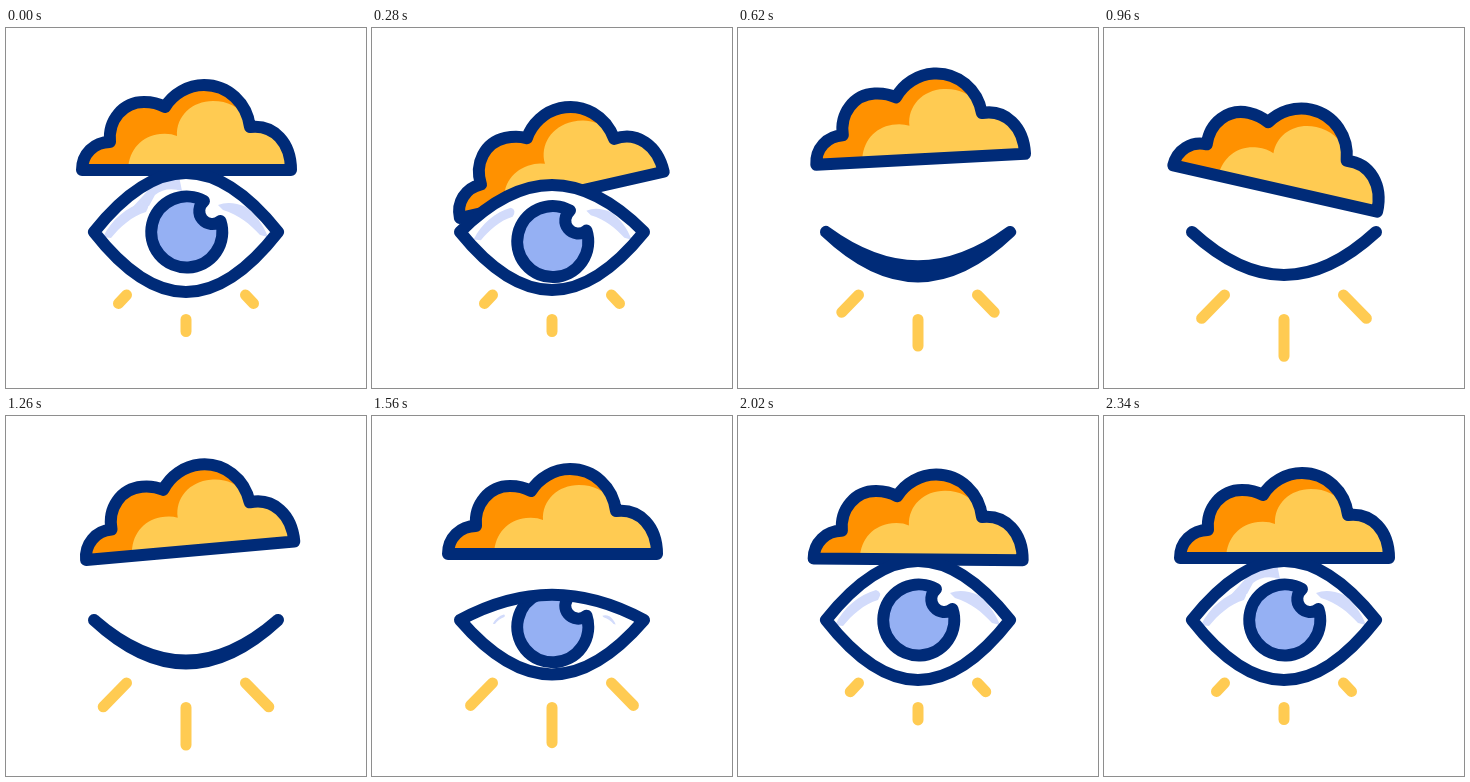
Animation, 360 px wide and 360 px high, one loop 2.4 s. Source, as an HTML page:

```html
<!DOCTYPE html>
<html lang="en">
<head>
<meta charset="utf-8">
<title>Cloud and eye</title>
<style>
html, body { margin: 0; width: 100%; height: 100%; overflow: hidden; background: #fff; }
svg { display: block; width: 100%; height: 100%; }
.line { stroke: #002b78; stroke-width: 12; stroke-linecap: round; stroke-linejoin: round; }
.shade { fill: #d2dbfb; }
</style>
</head>
<body>
<svg viewBox="0 0 360 360" fill="none">
  <defs>
    <clipPath id="opening"><path id="openingShape"/></clipPath>
    <path id="puff" d="M76 142C76 126 88 114 104 114C102 92 117 74 138 74Q150 74 159 79C167 66 182 57 198 57C222 57 241 75 244 99C268 96 285 115 285 142Z"/>
  </defs>
  <path id="rays" stroke="#ffcb52" stroke-width="11" stroke-linecap="round"/>
  <g id="cloud">
    <use href="#puff" fill="#ff9100"/>
    <path fill="#ffcb52" d="M122 142C123 121 136 108 154 106Q164 105 171 108C170 88 186 73 207 73C222 73 233 79 238 89L244 99C268 96 285 115 285 142Z"/>
    <use href="#puff" class="line"/>
  </g>
  <path id="white" fill="#fff"/>
  <g clip-path="url(#opening)">
    <path id="topShade" class="shade" d="M124 182L146 158L173 148L176 163Q160 158 149 167L143 178Z"/>
    <path id="leftShade" class="shade" d="M97 209C106 191 121 179 138 174Q145 176 140 184C126 188 114 199 105 210Z"/>
    <path id="rightShade" class="shade" d="M212 177Q224 172 240 179C249 186 257 196 262 209L254 207C244 196 233 187 217 182Z"/>
    <path id="iris" class="line" fill="#95b0f3" d="M198 173A35.500 35.500 0 1 0 214.500 193A12 12 0 1 1 198 173Z"/>
  </g>
  <path id="eye" class="line"/>
</svg>
<script>
const LOOP = 2400;
const el = id => document.getElementById(id);
const sine = p => (1 - Math.cos(Math.PI * p)) / 2;
const quad = p => p < .5 ? 2 * p * p : 1 - 2 * (1 - p) ** 2;
const quadOut = p => 1 - (1 - p) ** 2;
const part = (t, from, to) => Math.min(1, Math.max(0, (t - from) / (to - from)));

// [time, value] pairs joined by sine easing
const drop = [[0, 0], [330, 27.5], [725, -18], [980, 20], [1370, -13], [1800, 9], [2100, 0], [LOOP, 0]];
const tilt = [[0, 0], [330, -13.5], [1000, 13], [1290, -5.5], [1800, 4.5], [2080, 0], [LOOP, 0]];

function sway(keys, t) {
  const i = keys.findIndex(key => key[0] > t);
  const [t0, a] = keys[i - 1], [t1, b] = keys[i];
  return a + (b - a) * sine(part(t, t0, t1));
}

function eyePath(lid, bottom) {
  const bend = y => 204 + .64 * (y - 204);
  return `M88 204C118 ${bend(lid)} 148 ${lid} 180 ${lid}S242 ${bend(lid)} 272 204` +
    `C242 ${bend(bottom)} 212 ${bottom} 180 ${bottom}S118 ${bend(bottom)} 88 204Z`;
}

function place(id, transform) {
  el(id).setAttribute('transform', transform);
}

function shrink(id, x, y, dx, dy, scale) {
  place(id, `translate(${x + dx} ${y + dy}) scale(${scale}) translate(${-x} ${-y})`);
}

function draw(t) {
  place('cloud', `translate(0 ${sway(drop, t)}) rotate(${sway(tilt, t)} 180 100)`);

  const shut = quad(part(t, 130, 750)) - quad(part(t, 1193, 1813));
  const outline = eyePath(145 + 102 * shut, 264 - 17 * shut);
  for (const id of ['openingShape', 'white', 'eye']) el(id).setAttribute('d', outline);
  place('iris', `translate(0 ${16 * (sine(part(t, 0, 500)) - sine(part(t, 1250, 1813)))})`);

  const scale = Math.max(0, 1 - 6.7 * shut * shut);
  shrink('leftShade', 120, 192, 21 * shut, 34 * shut, scale);
  shrink('rightShade', 237, 192, 0, 36 * shut, scale);
  el('topShade').style.display = t < 60 || t > 2200 ? '' : 'none';

  const grow = 25.5 * (quadOut(part(t, 380, 1080)) - quad(part(t, 1420, 2080)));
  const side = 8 + .6 * grow;
  el('rays').setAttribute('d',
    `M180 291.500v${12 + grow}M120.500 267l${-side} ${side + .5}M239.500 267l${side} ${side + .5}`);
}

function frame(now) {
  draw(now % LOOP);
  requestAnimationFrame(frame);
}
draw(0);
requestAnimationFrame(frame);
</script>
</body>
</html>
```
